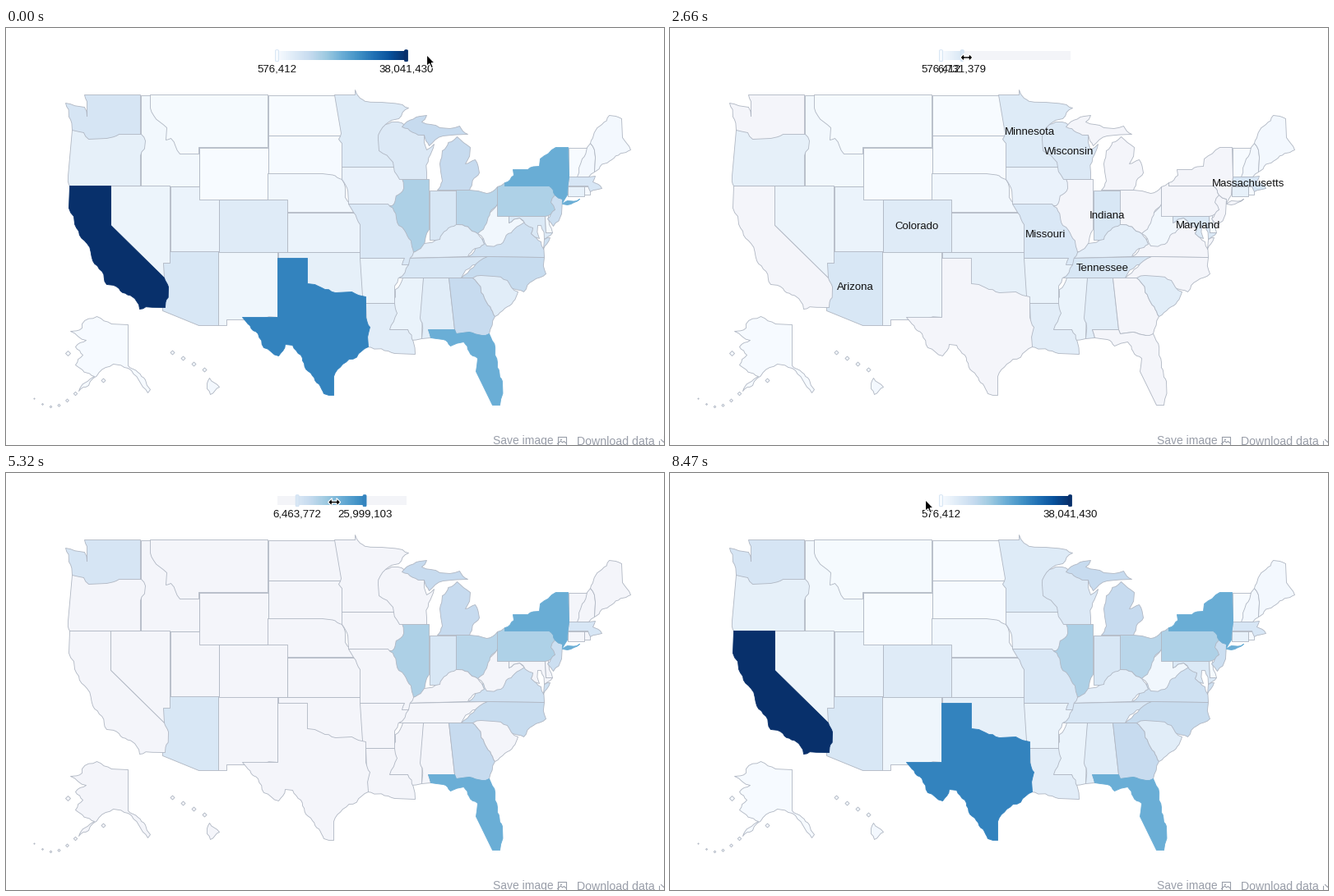
These frames come from a looping animation (800x508 px, 8.54 s). A matplotlib script:

```python
import math

import numpy as np
import matplotlib.pyplot as plt
from matplotlib.animation import FuncAnimation
from matplotlib.patches import FancyBboxPatch, PathPatch, Polygon
from matplotlib.path import Path

W, H, FRAMES, STEP = 800, 508, 122, 70
LOW, HIGH = 576412, 38041430
UNITS = 140                       # the slider moves in whole units
BAR_X, BAR_W = 329, 157
NEAR = 6.3                        # reach of the hover highlight, in units
LAG = 100                         # the handle follows the pointer, in ms
MUTED, HOVER, LINE, GREY = '#f4f5fa', '#e0e3e8', '#b0b7c3', '#999ea9'
BLUES = plt.cm.Blues
PX = 0.72                         # points per pixel at 100 dpi

fig = plt.figure(figsize=(W / 100, H / 100), dpi=100, facecolor='white')
ax = fig.add_axes([0, 0, 1, 1])
ax.axis('off')


def rough(a, b):
    """Break a slanted border into small wobbling pieces, same both ways."""
    dx, dy = b[0] - a[0], b[1] - a[1]
    n = math.hypot(dx, dy)
    if min(abs(dx), abs(dy)) < 2 or not 6 < n < 45:
        return [a]
    p, q = sorted((a, b))
    k = 0.11 * math.sin(12.9 * p[0] + 78.2 * p[1] + 37.7 * q[0] + 9.1 * q[1])
    mid = ((p[0] + q[0]) / 2 - k * (q[1] - p[1]),
           (p[1] + q[1]) / 2 + k * (q[0] - p[0]))
    return rough(a, mid) + rough(mid, b)


def outline(flat):
    pts = list(zip(flat[::2], flat[1::2]))
    out = [p for a, b in zip(pts, pts[1:] + pts[:1]) for p in rough(a, b)]
    return Path(out + out[:1], closed=True)


def centroid(path):
    x, y = path.vertices[:-1].T
    x2, y2 = np.roll(x, -1), np.roll(y, -1)
    c = x * y2 - x2 * y
    return ((x + x2) * c).sum() / c.sum() / 3, ((y + y2) * c).sum() / c.sum() / 3


def box(x0, y0, x1, y1):
    return [x0, y0, x1, y0, x1, y1, x0, y1]


def islet(x, y, r):
    return [x - r, y, x, y - r, x + r, y, x, y + r]


def text(x, y, s, size=13.3, color='#111', ha='center'):
    return ax.text(x, y, s, fontsize=size * PX, color=color, ha=ha,
                   va='baseline', family='Liberation Sans', zorder=5)


states = []


def state(name, millions, *rings):
    paths = [outline(r) for r in rings]
    patch = PathPatch(Path.make_compound_path(*paths), lw=0.85 * PX,
                      joinstyle='round', zorder=2)
    ax.add_patch(patch)
    x, y = centroid(paths[0])
    unit = max(0, (millions * 1e6 - LOW) / (HIGH - LOW) * UNITS)
    states.append((patch, text(x, y + 4.6, name), unit))


# Painted in order: a later state lays its border over the simpler one below.
state('Washington', 6.9, [95, 81, 163, 81, 163, 131, 100, 138, 80, 124, 72, 91, 95, 96, 98, 107, 98, 89])
state('Idaho', 1.6, box(163, 81, 234, 192))
state('Oregon', 3.9, [80, 124, 94, 127, 100, 135, 122, 134, 137, 129, 164, 129, 169, 137, 163, 155,
                      163, 192, 77, 192, 75, 180])
state('Montana', 1.01, [175, 81, 318, 81, 318, 145, 234, 145, 234, 153, 211, 153, 200, 134, 194, 136,
                        195, 121, 179, 106, 175, 97])
state('Utah', 2.86, box(199, 192, 258, 272))
state('Wyoming', 0.576, box(234, 145, 318, 208))
state('Arizona', 6.55, [190, 272, 258, 272, 258, 362, 234, 362, 190, 344])
state('Nevada', 2.76, [127, 192, 199, 192, 199, 286, 191, 286, 192, 304, 127, 240])
state('New Mexico', 2.09, [258, 272, 330, 272, 330, 352, 288, 355, 268, 355, 268, 362, 258, 362])
state('North Dakota', 0.7, box(318, 81, 407, 130))
state('South Dakota', 0.83, box(318, 130, 408, 184))
state('Nebraska', 1.86, [318, 177, 384, 177, 408, 184, 424, 224, 318, 224])
state('Colorado', 5.19, box(258, 208, 341, 272))
state('Kansas', 2.89, box(341, 224, 430, 272))
state('Oklahoma', 3.81, box(330, 272, 433, 326))

state('Minnesota', 5.38, [399, 81, 424, 81, 424, 75, 430, 85, 456, 90, 489, 97, 461, 117, 472, 169,
                          408, 169, 408, 140, 404, 135, 407, 128])
state('Illinois', 12.88, [466, 190, 478, 184, 514, 184, 514, 245, 508, 264, 500, 272, 485, 270, 466, 220])
state('Indiana', 6.54, box(514, 197, 547, 257))
state('Iowa', 3.07, [408, 169, 471, 169, 483, 195, 469, 216, 416, 214, 408, 184])
state('Wisconsin', 5.73, [461, 117, 476, 114, 508, 130, 511, 148, 520, 141, 511, 176, 511, 184, 478, 184,
                          470, 163, 453, 149, 452, 135])
state('Virginia', 8.19, [561, 278, 590, 250, 622, 230, 640, 238, 638, 250, 650, 260, 654, 279],
      [654, 257, 661, 255, 653, 269])
state('West Virginia', 1.86, [597, 214, 611, 229, 611, 237, 624, 231, 630, 236, 618, 244, 601, 263,
                              584, 265, 573, 250])
state('Ohio', 11.54, [547, 197, 563, 197, 584, 201, 597, 193, 597, 214, 584, 237, 573, 250, 547, 239])
state('Michigan', 9.88, [481, 120, 511, 106, 505, 114, 527, 121, 551, 119, 561, 129, 531, 131, 514, 143,
                         508, 130],
      [548, 132, 564, 145, 558, 165, 570, 160, 575, 176, 563, 197, 524, 197, 530, 186, 527, 165,
       530, 149])
state('Kentucky', 4.38, [488, 274, 497, 272, 508, 262, 527, 257, 547, 239, 573, 250, 581, 263, 561, 278,
                         486, 280])
state('Tennessee', 6.46, [486, 280, 585, 278, 553, 304, 478, 304])
state('Mississippi', 2.98, [482, 304, 507, 304, 505, 378, 491, 380, 488, 367, 466, 367, 470, 335])
state('Alabama', 4.82, [507, 304, 538, 304, 545, 367, 513, 367, 516, 377, 505, 378, 503, 353])
state('Arkansas', 2.95, [430, 280, 489, 280, 489, 288, 472, 324, 472, 335, 437, 335, 433, 326])
state('Missouri', 6.02, [416, 214, 464, 214, 477, 240, 484, 246, 495, 273, 489, 288, 481, 288, 484, 280,
                         430, 280, 430, 239, 422, 224])
state('Louisiana', 4.6, [437, 335, 472, 335, 475, 347, 466, 367, 488, 367, 497, 397, 472, 396, 439, 388])
state('Georgia', 9.92, [538, 304, 567, 304, 581, 328, 594, 351, 587, 372, 580, 378, 578, 374, 547, 372,
                        545, 367])
state('North Carolina', 9.75, [553, 304, 568, 291, 585, 278, 654, 279, 656, 299, 629, 321, 600, 318,
                               567, 304])
state('South Carolina', 4.72, [567, 304, 577, 301, 592, 302, 609, 307, 622, 321, 606, 341, 594, 351,
                               581, 328])

state('Pennsylvania', 12.76, [597, 193, 606, 188, 606, 192, 660, 192, 667, 203, 667, 221, 658, 229,
                              597, 229])
state('Maryland', 5.88, [611, 229, 655, 229, 656, 249, 664, 249, 654, 257, 650, 240, 646, 240, 648, 256,
                         638, 250, 640, 243, 624, 231, 611, 237])
state('Delaware', 0.92, [655, 229, 659, 228, 664, 249, 656, 249])
state('New Jersey', 8.86, [667, 203, 676, 208, 675, 226, 665, 241, 658, 232, 667, 221, 662, 212])
state('Vermont', 0.63, box(683, 145, 706, 181))
state('New Hampshire', 1.32, [706, 145, 710, 140, 715, 175, 708, 181, 694, 181, 700, 159])
state('Maine', 1.33, [710, 140, 724, 117, 733, 106, 748, 110, 749, 133, 759, 148, 736, 160, 715, 175])
state('Connecticut', 3.59, box(682, 192, 702, 204))
state('Rhode Island', 1.05, box(702, 192, 709, 202))
state('Massachusetts', 6.65, [684, 181, 708, 181, 716, 180, 713, 187, 724, 195, 710, 199, 707, 192,
                              682, 192])

state('Alaska', 0.73,
      [110, 351, 148, 361, 148, 411, 160, 419, 175, 440, 172, 444, 148, 414, 130, 409, 100, 435,
       88, 442, 107, 424, 84, 410, 93, 398, 84, 388, 97, 380, 78, 369, 92, 365, 92, 360],
      islet(75, 396, 3), islet(118, 429, 2.5),
      *[islet(84 - 10 * k, 445 + 16 * math.sin(0.55 * k), 2.2 - 0.3 * k) for k in range(6)])
state('Hawaii', 1.39, [247, 426, 259, 437, 248, 446, 244, 439],
      *[islet(202 + 13 * k, 395 + 7 * k, 2.5) for k in range(4)])

state('New York', 19.57,
      [606, 192, 606, 188, 617, 179, 616, 172, 634, 172, 648, 168, 649, 159, 668, 145, 683, 145, 684, 181,
       682, 203, 676, 213, 676, 208, 667, 203, 660, 192],
      [676, 214, 682, 210, 697, 208, 682, 215])
state('Florida', 19.32, [513, 367, 545, 367, 547, 372, 578, 374, 587, 372, 597, 407, 603, 430, 600, 459,
                         591, 459, 571, 418, 573, 402, 556, 382, 540, 387, 531, 379, 516, 377])
state('Texas', 26.06, [330, 280, 366, 280, 366, 311, 400, 322, 420, 321, 437, 327, 437, 352, 442, 364,
                       440, 388, 409, 409, 398, 424, 398, 447, 386, 445, 372, 423, 358, 398, 348, 386,
                       339, 385, 331, 399, 313, 389, 306, 372, 287, 352, 330, 352])
state('California', 38.04, [77, 192, 127, 192, 127, 240, 192, 304, 197, 315, 193, 340, 162, 342, 158, 332,
                            137, 317, 122, 312, 105, 283, 98, 262, 88, 247, 82, 229, 76, 219])

# footer tools
text(592, 507, 'Save image', 13.9, GREY, 'left')
text(693, 507, 'Download data', 14.1, GREY, 'left')
for xs, ys in (([670, 680, 680, 670, 670], [497, 497, 507, 507, 497]),
               ([670, 674, 676, 678, 680], [506, 502.5, 504.5, 503, 505]),
               ([673, 674], [500, 500]),
               ([793, 793, 804], [502, 507, 507]),
               ([799, 799], [496, 504]), ([796, 799, 802], [501, 504, 501])):
    ax.plot(xs, ys, color=GREY, lw=1.1 * PX, zorder=3)

# slider
GRADIENT = BLUES(np.linspace(0, 1, BAR_W))[None]
bar = ax.imshow(GRADIENT, extent=(BAR_X, BAR_X + BAR_W, 38.5, 27.5),
                aspect='auto', interpolation='nearest', zorder=2)
grips, grip_labels = [], []
for _ in range(2):
    grip = FancyBboxPatch((0, 27), 2.4, 12.4, boxstyle='round,pad=0.8,rounding_size=1.2',
                          lw=0.8 * PX, zorder=4)
    ax.add_patch(grip)
    grips.append(grip)
    grip_labels.append(text(0, 52.7, ''))
hover_label = text(0, 57.6, '')

ARROW = np.array([(0, 0), (0, 14), (3.3, 11), (5.6, 16.3), (8, 15.3), (5.7, 10.2), (9.8, 10.2)])
half = [(-7.5, 0), (-2.8, -4.8), (-2.8, -1.3), (2.8, -1.3), (2.8, -4.8)]
RESIZE = np.array(half + [(-x, -y) for x, y in half])
cursor = Polygon(ARROW, facecolor='black', edgecolor='white', lw=1.2 * PX, zorder=9)
ax.add_patch(cursor)

# whole coordinates are pixel centres
ax.set_xlim(-0.5, W - 0.5)
ax.set_ylim(H - 0.5, -0.5)

# phases of the pointer, in ms
GRAB, DROP, GRAB_RANGE, DROP_RANGE, GRAB_LOW, LEAVE = 420, 3900, 4850, 6450, 7560, 8200


def track(t, *keys):
    return np.interp(t, *zip(*keys))


def high(t):
    return track(t, (GRAB, 140), (1750, 75), (2600, 20), (3360, 56), (DROP, 73),
                 (GRAB_RANGE, 73), (6020, 129), (6400, 140))


def low(t):
    return track(t, (GRAB_RANGE, 0), (6020, 56), (6400, 67), (GRAB_LOW, 67), (8250, 0))


def to_x(unit):
    return BAR_X + unit / UNITS * BAR_W


def pointer(t):
    if t < GRAB:
        return track(t, (0, 511), (280, 486))
    if t < DROP:
        return to_x(high(t + LAG))
    if t < GRAB_RANGE:
        return track(t, (4200, 411), (4690, 368))
    if t < DROP_RANGE:
        return 368 + to_x(low(t + LAG)) - BAR_X
    if t < GRAB_LOW:
        return track(t, (6700, 443), (7420, 407))
    if t < LEAVE:
        return to_x(low(t + LAG))
    return track(t, (LEAVE, 329), (8470, 310))


def to_value(unit):
    return f'{LOW + (HIGH - LOW) * unit / UNITS:,.0f}'


def edge(frac):
    return BLUES(frac) if frac > 0.45 else LINE


def draw(i):
    t = i * STEP
    lo, hi = round(float(low(t))), round(float(high(t)))
    cx = pointer(t)
    hovering = DROP < t < GRAB_RANGE or DROP_RANGE <= t < GRAB_LOW

    focus = None
    if hovering:
        focus = round((cx - BAR_X) / BAR_W * UNITS - 0.6) + 0.17041
    elif GRAB <= t < DROP:
        focus = hi
    elif GRAB_LOW <= t < LEAVE:
        focus = lo

    for patch, label, unit in states:
        active = lo <= unit <= hi
        near = active and focus is not None and abs(unit - focus) < NEAR
        frac = unit / UNITS
        greyed = near and hovering
        patch.set_facecolor(HOVER if greyed else BLUES(frac) if active else MUTED)
        patch.set_edgecolor(edge(frac) if active and not greyed else LINE)
        label.set_visible(near)

    xs = BAR_X + 0.5 + np.arange(BAR_W)
    inside = (xs >= to_x(lo)) & (xs <= to_x(hi))
    muted = np.array([243, 244, 248, 255]) / 255
    bar.set_data(np.where(inside[None, :, None], GRADIENT, muted))

    for grip, label, unit in zip(grips, grip_labels, (lo, hi)):
        x, frac = to_x(unit), unit / UNITS
        grip.set_x(x - 1.2)
        grip.set_facecolor(BLUES(frac))
        grip.set_edgecolor(BLUES(max(frac, 0.2)))
        label.set_x(x)
        label.set_text(to_value(unit))
        label.set_alpha(0.12 if hovering else 1)

    hover_label.set_visible(hovering)
    if hovering:
        hover_label.set_x(to_x(focus) + 0.6)
        hover_label.set_text('≈ ' + to_value(focus))

    arrow = t < 210 or t > 8300
    cy = 32 if arrow else 35 + 9 * math.exp(-((t - 3360) / 400) ** 2)
    cursor.set_xy((ARROW if arrow else RESIZE) + (cx, cy))
    return []


anim = FuncAnimation(fig, draw, frames=FRAMES, interval=STEP, repeat=True,
                     repeat_delay=0, blit=False)
plt.show()
```
